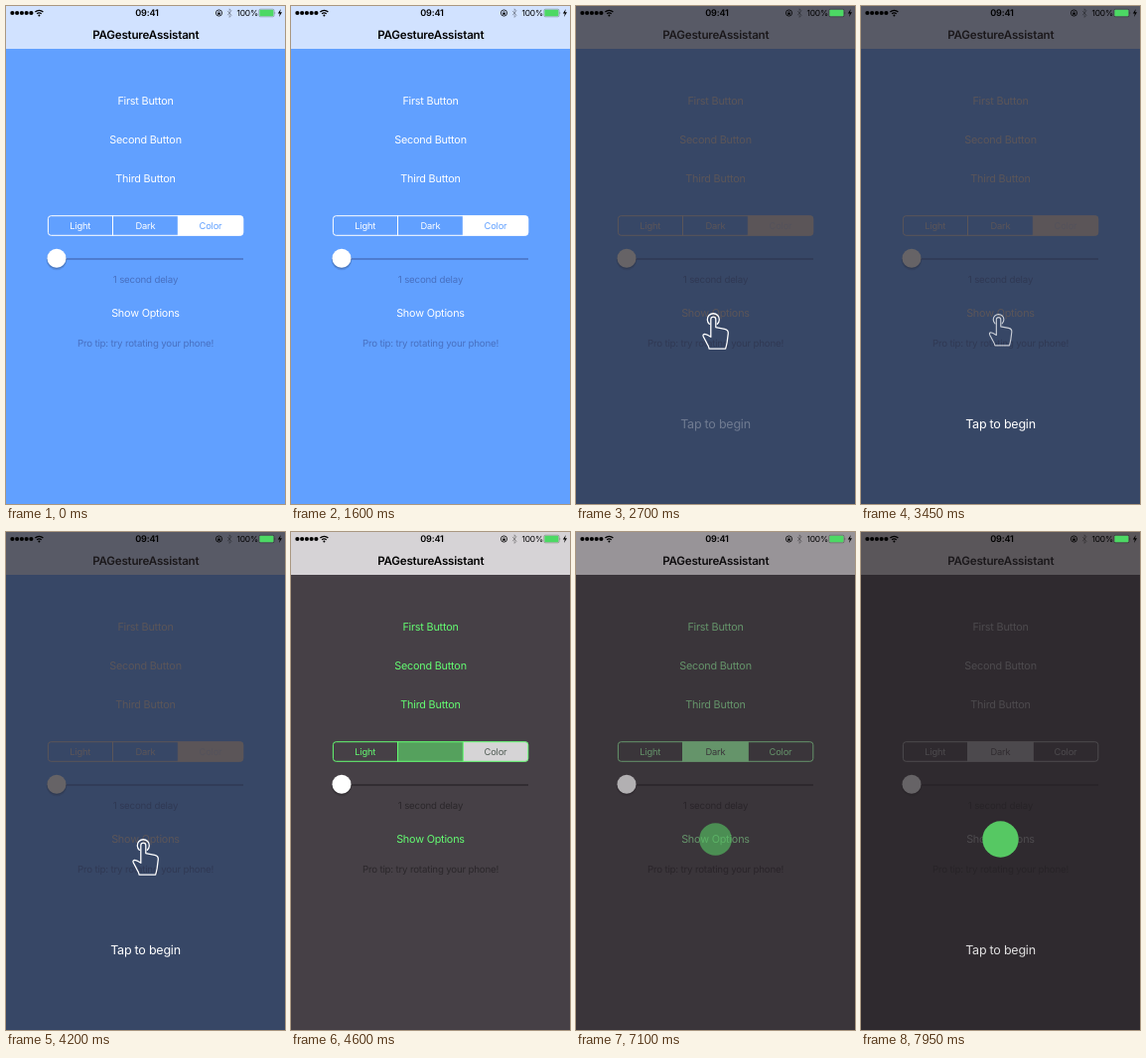
An HTML page that plays this animation: 281 px wide and 500 px high, repeating every 8 s.

```html
<!DOCTYPE html>
<html lang="en">
<head>
<meta charset="utf-8">
<title>Gesture assistant</title>
<style>
html, body { margin: 0; width: 100%; height: 100%; overflow: hidden; }
svg { display: block; width: 281px; height: 500px; }
text { font-family: Inter, "Open Sans", sans-serif; letter-spacing: -.018em; text-anchor: middle; text-rendering: geometricPrecision; }
.btn { font-size: 10.8px; }
.seg { font-size: 9.3px; }
.note { font-size: 9.7px; }
</style>
</head>
<body>
<svg viewBox="0 0 281 500">
  <rect id="bg" width="281" height="500"/>
  <rect id="bar" width="281" height="43"/>
  <text x="140.8" y="32.8" font-size="11.6" font-weight="600">PAGestureAssistant</text>

  <g class="btn tint">
    <text x="140.5" y="99">First Button</text>
    <text x="140.5" y="137.8">Second Button</text>
    <text x="140.5" y="176.5">Third Button</text>
    <text x="140.5" y="312.3">Show Options</text>
  </g>

  <path id="fillDark" d="M107.5 210.5H173.3V230.5H107.5Z"/>
  <path id="fillColor" d="M173.3 210.5H236a3 3 0 0 1 3 3V227.5a3 3 0 0 1 -3 3H173.3Z"/>
  <g id="frame" fill="none">
    <rect x="42.4" y="210.7" width="196.4" height="19.6" rx="3"/>
    <path d="M107.5 210.5V230.5M173.3 210.5V230.5"/>
  </g>
  <g class="seg">
    <text class="tint" x="74.7" y="223.7">Light</text>
    <text id="dark" x="140.5" y="223.7">Dark</text>
    <text id="color" x="206" y="223.7">Color</text>
  </g>

  <path id="track" d="M51 254H239" stroke-width="1.5"/>
  <circle cx="51" cy="255" r="10.3" opacity=".1"/>
  <circle cx="51" cy="254.3" r="9.9" opacity=".14"/>
  <circle cx="51" cy="253.3" r="9.5" fill="#fff"/>
  <g id="notes" class="note">
    <text x="140.5" y="278.4">1 second delay</text>
    <text x="140.5" y="342">Pro tip: try rotating your phone!</text>
  </g>

  <rect id="shade" width="281" height="500" fill="rgb(37,33,38)"/>

  <g id="hand" fill="none" stroke="#fff" stroke-width="1.3" stroke-linejoin="round" stroke-linecap="round">
    <path d="M134.3 319.2A6 6 0 1 1 142.3 319.2"/>
    <path d="M135.8 332.2V314.6a2.5 2.5 0 0 1 5 0V322.6l9 1.7q3.8 .9 3.5 4.4l-1.2 9.3q-.5 2.6 -1.5 6.2H134.2q-.5 -2.6 -2.4 -5.6l-3.5 -6.6q-1 -2.4 1.1 -2.7q2.1 0 6.4 3"/>
  </g>
  <circle id="dot" cx="140.5" cy="308.5" r="18.2" fill="#56c863"/>
  <text id="begin" x="140.5" y="423.7" font-size="12.5" fill="#fff">Tap to begin</text>

  <g id="status">
    <g id="signal"></g>
    <g fill="none" stroke="#000" stroke-width="1.2">
      <path d="M29.4 6a5.6 5.6 0 0 1 8 0M31.1 7.8a3.2 3.2 0 0 1 4.6 0"/>
    </g>
    <circle cx="33.4" cy="9.6" r="1"/>
    <text x="142" y="10.1" font-size="9.1" font-weight="600">09:41</text>
    <circle cx="214.5" cy="7" r="3.1" fill="none" stroke="#000" stroke-width=".8"/>
    <path d="M213.2 6.8h2.6v1.9h-2.6z"/>
    <path d="M213.7 6.9v-.6a.8 .8 0 0 1 1.6 0v.6" fill="none" stroke="#000" stroke-width=".5"/>
    <path d="M222.9 4.9L227.2 9.2L225.1 11.4V2.8L227.2 5L222.9 9.2" fill="none" stroke="#000" stroke-width=".7" opacity=".4"/>
    <text x="243.2" y="10" font-size="8.4">100%</text>
    <rect x="254.8" y="3.2" width="15.2" height="7.6" rx="1.3" fill="none" stroke="#000" stroke-width=".5" opacity=".5"/>
    <rect x="255.4" y="3.8" width="14" height="6.4" rx=".8" fill="#4cd964"/>
    <path d="M270.7 5.6q1.2 1.4 0 2.8z" opacity=".5"/>
    <path d="M276.8 3.1L273.8 7.5H275.8L275 11L278 6.3H276z"/>
  </g>
</svg>
<script>
const LOOP = 8000, SWITCH = 4550;
const el = id => document.getElementById(id);
const tints = document.querySelectorAll('.tint');

const themes = {
  color: { bg: [97, 160, 255], bar: [209, 226, 255], tint: [255, 255, 255], dim: [218, 208, 208], note: [72, 112, 192] },
  dark: { bg: [70, 64, 70], bar: [214, 211, 214], tint: [100, 252, 114], dim: [170, 170, 172], note: [43, 39, 43] }
};

const clamp = v => Math.max(0, Math.min(1, v));
const part = (t, a, b) => clamp((t - a) / (b - a));
const ease = (t, a, b) => { const p = part(t, a, b); return p * p * (3 - 2 * p); };
const mix = (a, b, p) => a.map((v, i) => v + (b[i] - v) * p);
const rgb = c => `rgb(${c.map(Math.round)})`;
const set = (node, attrs) => { for (const k in attrs) node.setAttribute(k, attrs[k]); };

el('signal').innerHTML = [0, 1, 2, 3, 4].map(i => `<circle cx="${6.4 + i * 4.75}" cy="7" r="2.1"/>`).join('');

function place(node, x, y, scale, alpha) {
  set(node, { transform: `translate(${x} ${y}) scale(${scale}) translate(${-x} ${-y})`, opacity: alpha });
}

function draw(t) {
  const isDark = t >= SWITCH;
  const th = isDark ? themes.dark : themes.color;
  const u = isDark ? t - 6650 : t - 1600; // time since the hint began

  const shade = ease(u, 0, 900), fade = shade * shade;
  const tint = mix(th.tint, th.dim, isDark ? shade : fade);
  set(el('bg'), { fill: rgb(th.bg) });
  set(el('bar'), { fill: rgb(th.bar) });
  set(el('notes'), { fill: rgb(th.note) });
  set(el('track'), { stroke: rgb(th.note) });
  set(el('frame'), { stroke: rgb(tint) });
  tints.forEach(n => set(n, { fill: rgb(tint) }));

  // selection cross-fades from Color to Dark
  const k = part(t, 4500, 4950);
  set(el('fillDark'), { fill: rgb(tint), opacity: isDark ? clamp(k * 2.3) : 0 });
  set(el('fillColor'), { fill: isDark ? '#fff' : rgb(tint), opacity: isDark ? 1 - k : 1 });
  set(el('dark'), { fill: rgb(isDark ? th.bg : tint), opacity: isDark ? part(k, .4, 1) : 1 });
  set(el('color'), { fill: rgb(isDark ? mix([80, 92, 84], tint, ease(k, .3, 1)) : mix(th.bg, th.dim, .8 * fade)) });

  set(el('shade'), { opacity: .7 * shade });
  const show = ease(u, 50, 750);
  const press = Math.sin(Math.PI * part(u, 1400, 2550)) ** 2;
  const scale = .74 + .26 * show - .13 * press;
  const alpha = show * (1 - .3 * press);
  place(el('hand'), 140.5, 316, scale, isDark ? 0 : alpha);
  place(el('dot'), 140.5, 308.5, scale, isDark ? alpha : 0);
  set(el('begin'), { opacity: ease(u, 930, 1420) });
}

function tick() {
  draw(performance.now() % LOOP);
  requestAnimationFrame(tick);
}
tick();
</script>
</body>
</html>
```
